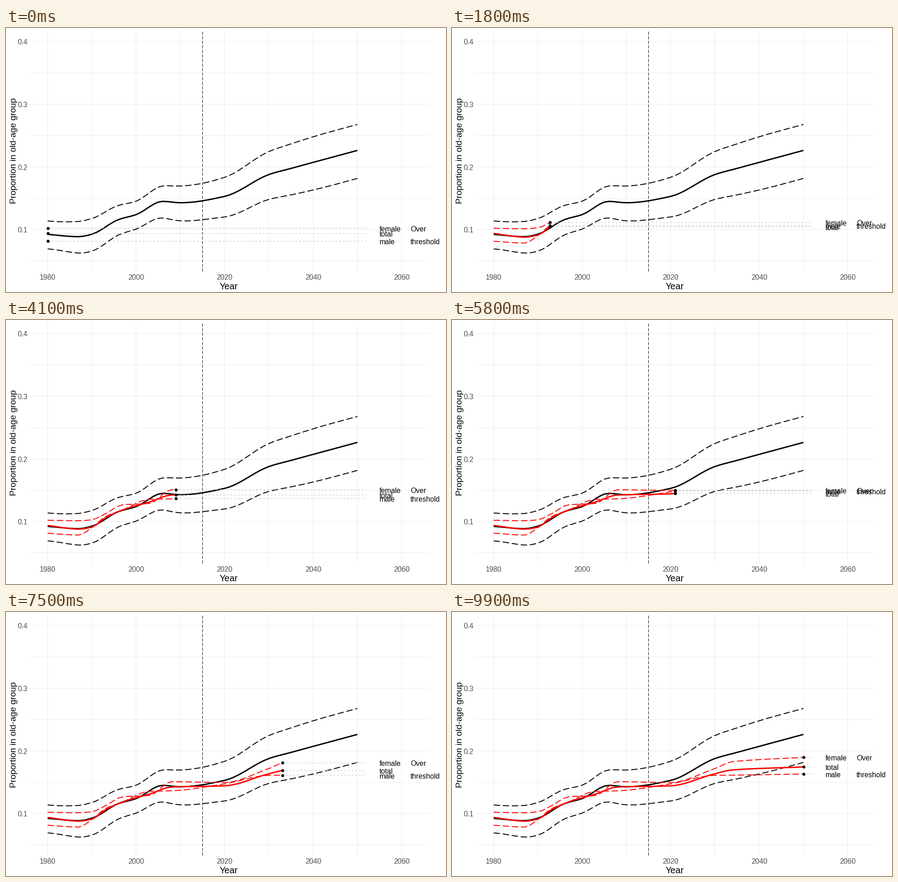
Recreate the animation shown at these times as a matplotlib script. Size 966 px wide and 580 px high, loop 10 s.

```python
import numpy as np
import matplotlib.pyplot as plt
from matplotlib.animation import FuncAnimation

W, H, DPI = 966, 580, 64
FRAMES = 100
PT = 72 / DPI  # points per pixel
YEARS = np.arange(1980, 2051)
LONG_DASH = (0, (7, 3))
DASH = (0, (4, 4))

plt.rcParams["font.family"] = "Liberation Sans"


def year_x(year):
    return 91 + (np.asarray(year) - 1980) * 680 / 70


def value_y(percent):
    return 29.8 + (40 - np.asarray(percent)) * 13.77


def smooth(keys, values):
    """Monotone cubic through a few key points, sampled once a year."""
    k, v = np.array(keys), np.array(values)
    d = np.diff(v) / np.diff(k)
    a, b = d[:-1], d[1:]
    inner = [2 * p * q / (p + q) if p * q > 0 else 0 for p, q in zip(a, b)]
    m = np.array([d[0], *inner, d[-1]])
    i = np.clip(np.searchsorted(k, YEARS, side="right") - 1, 0, len(k) - 2)
    step = k[i + 1] - k[i]
    t = (YEARS - k[i]) / step
    ease = t * t * (3 - 2 * t)
    bend = t * (1 - t) * step * ((1 - t) * m[i] - t * m[i + 1])
    return v[i] + (v[i + 1] - v[i]) * ease + bend


def band_width():
    """Half width of the band: a fading ripple, then an eased widening."""
    t = np.clip((YEARS - 2000) / 45, 0, 1)
    s = t * t * (3 - 2 * t)
    ripple = 0.18 * np.cos(2 * np.pi * (YEARS - 1980) / 20)
    return 2.32 + 1.82 * s - ripple * (1 - s) ** 3


fig = plt.figure(figsize=(W / DPI, H / DPI), dpi=DPI, facecolor="white")
ax = fig.add_axes([0, 0, 1, 1])
ax.set_xlim(-0.5, W - 0.5)
ax.set_ylim(H - 0.5, -0.5)
ax.axis("off")


def line(x, y, color, width, style="-"):
    return ax.plot(x, y, color=color, lw=width * PT, ls=style, snap=False,
                   solid_capstyle="butt", dash_capstyle="butt")[0]


def label(x, y, text, size, color="black", **kw):
    return ax.text(x, y, text, fontsize=size * PT, color=color,
                   va="baseline", **kw)


# Grid and axes
for percent in range(5, 41, 5):
    y = np.floor(value_y(percent))
    line([51, 928], [y, y], "#EBEBEB", 1)
    if percent % 10 == 0:
        label(46.5, y + 6.5, f"{percent / 100:.1f}", 15.8, "#4D4D4D", ha="right")
for year in range(1980, 2061, 10):
    x = np.floor(year_x(year) + 0.2)
    line([x, x], [5.5, 534.5], "#EBEBEB", 1)
    if year % 20 == 0:
        label(x, 552.5, str(year), 15.8, "#4D4D4D", ha="center")
label(488.5, 573, "Year", 20, ha="center")
label(21.5, 269.5, "Proportion in old-age group", 19.2, ha="center",
      rotation=90, rotation_mode="anchor")

# Fixed curves
mean = smooth([1980, 1987, 1990, 1996, 2000, 2006, 2010, 2020, 2030, 2035, 2050],
              [9.27, 8.91, 9.31, 11.63, 12.43, 14.54, 14.32, 15.34, 18.82, 19.8, 22.67])
for edge in (mean + band_width(), mean - 1.08 * band_width()):
    line(year_x(YEARS), value_y(edge), "black", 2, LONG_DASH)
line(year_x(YEARS), value_y(mean), "black", 3)
line([431, 431], [534.5, 5.5], "black", 1, LONG_DASH)


class Series:
    """A red curve that grows, with its dot, leader line and labels."""

    KEYS = [1980, 1987, 1990, 1993, 1997, 2003, 2008, 2020, 2030, 2034, 2050]

    def __init__(self, name, note, values, width, style):
        self.y = value_y(smooth(self.KEYS, values))
        self.curve = line([], [], "red", width, style)
        self.leader = line([], [], "#BEBEBE", 1, DASH)
        self.dot = ax.plot([], [], "o", color="black", ms=6.6 * PT, mew=0,
                           zorder=4)[0]
        self.texts = [label(year_x(2055), 0, name, 15.7, zorder=5),
                      label(year_x(2062), 0, note, 15.7, zorder=5)]

    def show(self, year):
        past = YEARS < year
        x, y = year_x(year), np.interp(year, YEARS, self.y)
        self.curve.set_data(np.append(year_x(YEARS[past]), x),
                            np.append(self.y[past], y))
        self.leader.set_data([x, year_x(2052)], [round(y), round(y)])
        self.dot.set_data([x], [y])
        for text in self.texts:
            text.set_y(y + 7)


series = [
    Series("female", "Over", [10.25, 10.18, 10.33, 11.27, 12.72, 12.94, 15.12,
                              15.01, 17.23, 18.32, 19.01], 2, LONG_DASH),
    Series("male", "threshold", [8.18, 7.89, 9.09, 10.8, 11.92, 13.59, 13.67,
                                 14.79, 16.14, 16.17, 16.35], 2, LONG_DASH),
    Series("total", "", [9.42, 8.84, 9.16, 10.62, 11.92, 13.16, 14.28,
                         14.47, 16.39, 17.01, 17.48], 3, "-"),
]


def update(frame):
    year = 1980 + 70 * frame / (FRAMES - 1)
    for s in series:
        s.show(year)


anim = FuncAnimation(fig, update, frames=FRAMES, init_func=lambda: update(0),
                     interval=100, repeat=True, repeat_delay=0)
plt.show()
```
